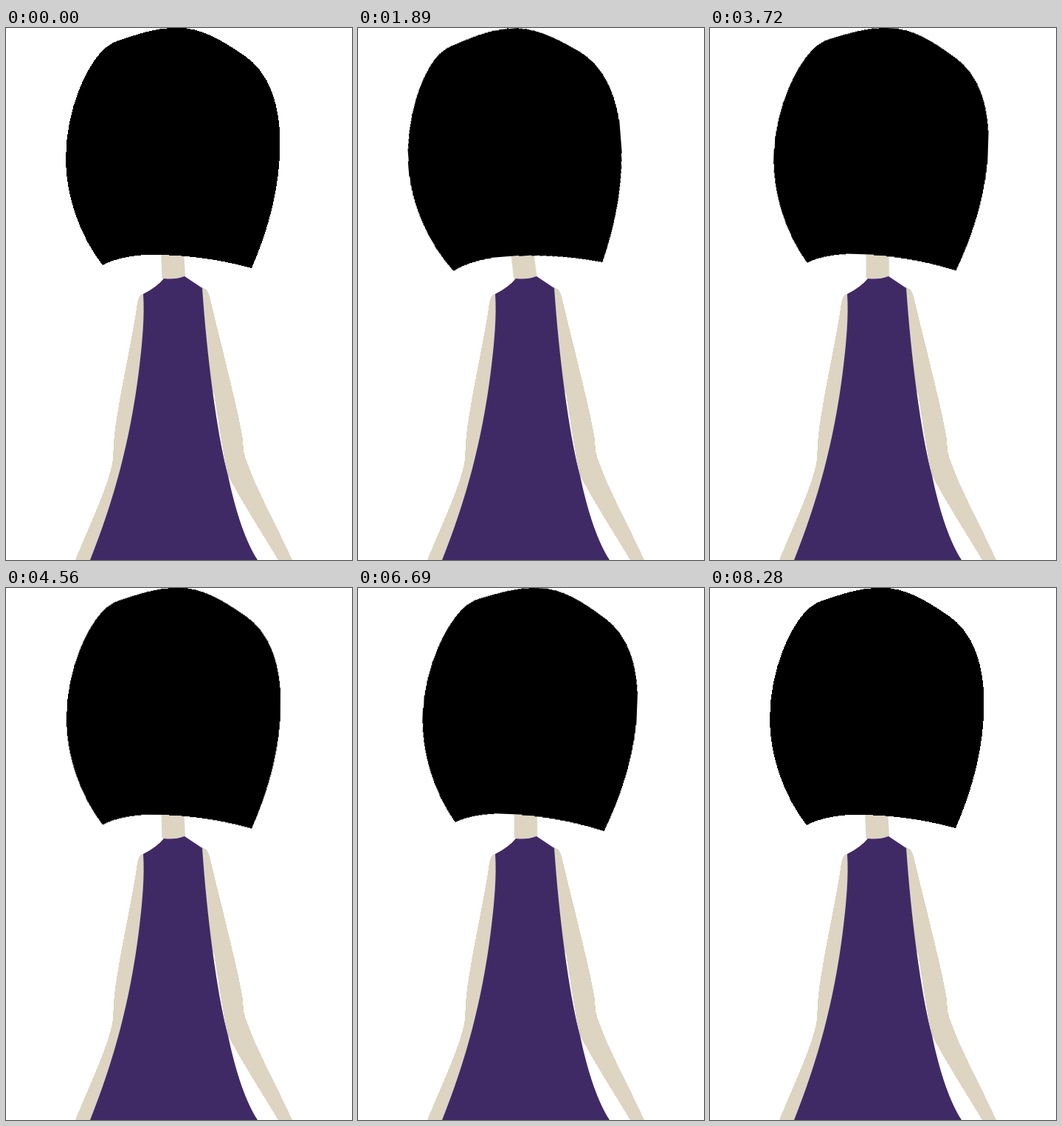
These frames come from a looping animation (469x720 px, 8310 ms). An HTML page:

```html
<!DOCTYPE html>
<html lang="en">
<head>
<meta charset="utf-8">
<title>Swaying head</title>
<style>
  html, body { margin: 0; width: 100%; height: 100%; overflow: hidden; background: #fff; }
  svg { display: block; width: 469px; height: 720px; }
  .skin { fill: #ddd4c2; }
  .dress { fill: #402a66; }
  .arms, .hair { shape-rendering: crispEdges; }

  /* The head pivots at the base of the neck, moving once every 30 ms. */
  .head { transform-origin: 231px 342px; animation: sway 8310ms infinite; }
  @keyframes sway {
    0%       { transform: rotate(0deg);      animation-timing-function: steps(45); }
    16.2455% { transform: rotate(-7.42deg);  animation-timing-function: steps(66); }
    40.0722% { transform: rotate(3.18deg);   animation-timing-function: steps(33); }
    51.9856% { transform: rotate(-0.2deg);   animation-timing-function: steps(56); }
    72.2022% { transform: rotate(3.25deg);   animation-timing-function: steps(76); }
    99.639%, 100% { transform: rotate(0deg); }
  }
</style>
</head>
<body>
<svg viewBox="0 0 469 720">
  <g class="skin arms">
    <path d="M188 360Q180 358 177.5 375C172 420 149 515 146 562C145 575 146 585 142 598C132 635 110 680 94 720H160L200 400Z"/>
    <path d="M262 351Q273 350 276 363C285 403 308 490 318 540C323 562 320 570 325 583C339 624 368 676 388 720H369C346 682 322 645 301 606C296 588 290 545 282 495L270 480Z"/>
  </g>
  <g class="head">
    <path class="skin" d="M210 300H241L243 338Q228 345 211.5 339Z"/>
    <path class="hair" d="M131 321C101 283 81 228 81 178C81 144 88 111 99 84C111 54 128 25 152 17C177 9 201 0 229 -.5C265 -1 291 16 322 36.5C358 60 371.5 106 371.5 155C371.5 215 356 272 333 325C299 316 262 308.5 210 307C180 305.5 149 311 131 321Z"/>
  </g>
  <path class="dress" d="M214 339Q229 341 242 336L266 352C272 440 285 545 301 606C310 648 322 690 341 720H114C146 640 168 560 180 465C185 425 188 390 186 360Q204 351 214 339Z"/>
</svg>
</body>
</html>
```
